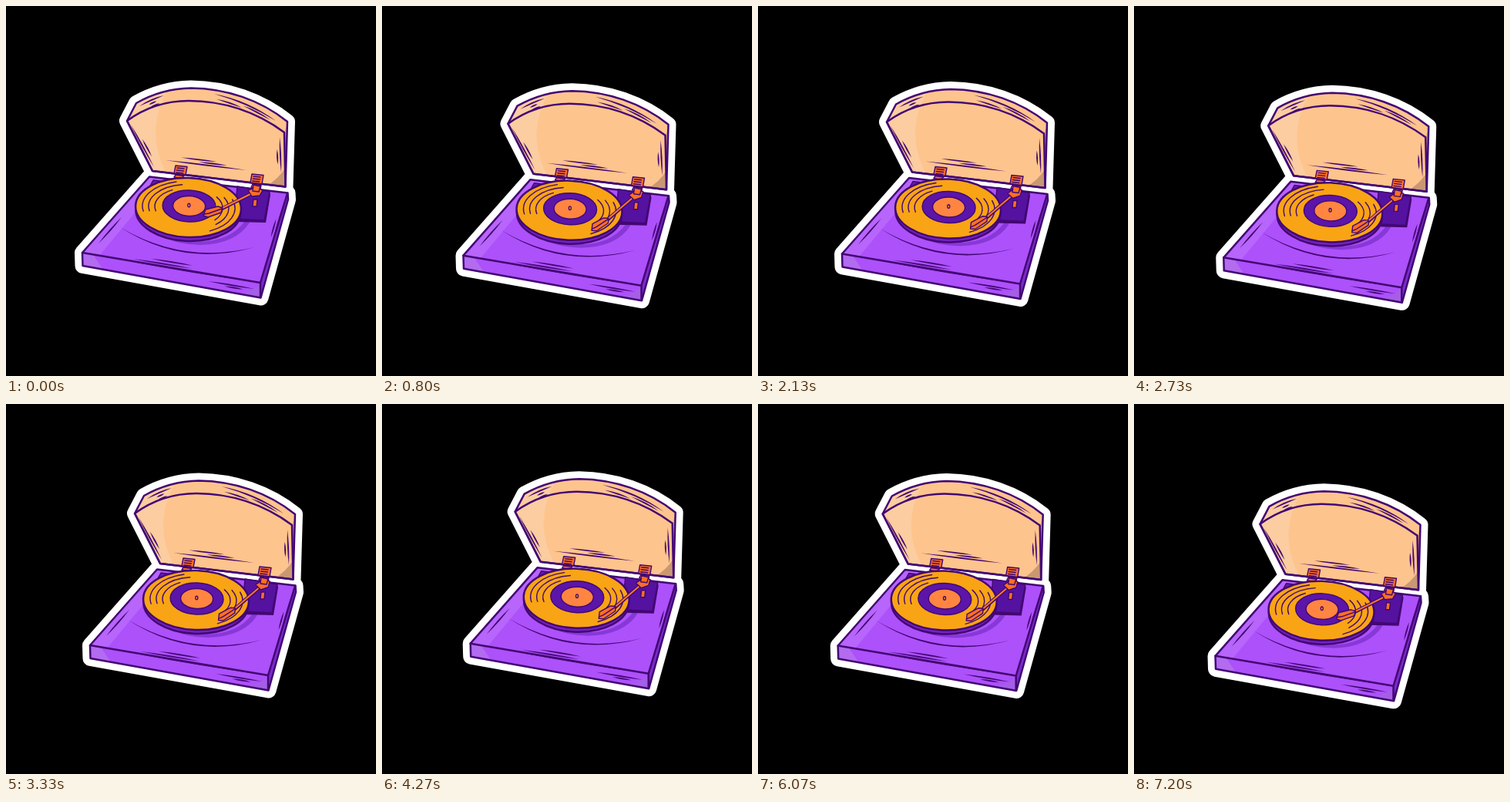
An HTML page that plays this animation: 480x480 px, repeating every 7270 ms.

```html
<!DOCTYPE html>
<html lang="en">
<head>
<meta charset="utf-8">
<title>Record player sticker</title>
<style>
  html, body { margin: 0; width: 100%; height: 100%; overflow: hidden; background: #000; }
  svg { display: block; width: 100vw; height: 100vh; }
  .ink { stroke: #430773; stroke-width: 2.5; stroke-linejoin: round; stroke-linecap: round; }
  .thin { stroke-width: 1.4; }
  .line { fill: none; }
  .orange { fill: #fb6f24; }
</style>
</head>
<body>
<svg viewBox="0 0 480 480">
  <defs>
    <path id="lid" d="M157 149 L169 126 C190 114 214 107 240 106.500 C286 107 330 122 365 150 L362.500 234.500 L190 214 Z"/>
    <path id="body" d="M186 221.500 L365.500 242.500 L366 251 L330.500 378.500 L99.500 337 L99 320 Z"/>
    <path id="face" d="M157 149 C183 130 209 123 237 123 C283 123 326 138 361 164 L362.500 234.500 L190 214 Z"/>
    <clipPath id="inLid"><use href="#lid"/></clipPath>
    <clipPath id="inBody"><use href="#body"/></clipPath>
  </defs>
  <g id="sticker">
    <g fill="#fff" stroke="#fff" stroke-width="20" stroke-linejoin="round">
      <use href="#lid"/><use href="#body"/>
    </g>

    <!-- lid -->
    <use href="#lid" fill="#fec48d"/>
    <g clip-path="url(#inLid)">
      <path d="M150 100 H215 Q176 160 210 220 H150 Z" fill="#fbcda0"/>
      <path d="M337 234 Q353 225 364 208 V238 Z" fill="#c99873"/>
      <path d="M361 164 L366 150 L363 235 Z" fill="#e0a97e"/>
    </g>
    <use href="#face" class="ink line"/>
    <use href="#lid" class="ink line"/>

    <!-- body -->
    <use href="#body" fill="#ad51fb"/>
    <g clip-path="url(#inBody)">
      <path d="M186 221 L204 224 L121 324 L98 320 Z" fill="#b765fb"/>
      <path d="M98 320 L113 322.500 L126 342 L99 338 Z" fill="#b36bf0"/>
      <path d="M330 359 L365 243 L370 252 L331 381 Z" fill="#7a2bcb"/>
      <path d="M296 374 Q319 372 330 360 V380 Z" fill="#a45fe6"/>
    </g>
    <path class="ink line" d="M99 320 L330 359 L365 243 M330 359 V378"/>
    <use href="#body" class="ink line"/>

    <!-- deck -->
    <path class="ink thin" fill="#6419b5" d="M191 226 L207 228 L194 241 L186 235 Z"/>
    <path fill="#8738d7" d="M203 299 Q281 319 310 279 L316 281 Q298 309 252 310 Q221 309 203 299 Z"/>
    <path class="ink thin" fill="#5512a0" d="M300 234 L342 241 L335 278 L296 276 Z"/>
    <path fill="#430773" d="M296 276 L335 278 L342 241 L343 245 L337 281 L297 280 Z"/>

    <!-- hinges -->
    <g class="ink thin orange" id="hinges">
      <path d="M220 207 L235 208.500 L233 219 L218 217 Z M220 219 L231 220.500 L227 224 L218 222 Z"/>
      <path d="M319 218 L334 219.500 L332 231 L317 229 Z M320 231 L331 232.500 L330 238 L318 235 Z"/>
    </g>

    <!-- record -->
    <g transform="rotate(2 237 262)">
      <ellipse class="ink" cx="236.500" cy="266" rx="68" ry="39" fill="#7422be"/>
      <ellipse class="ink" cx="236.500" cy="261.500" rx="68.500" ry="38.500" fill="#f9a415"/>
      <g class="ink thin line" id="grooves"></g>
      <ellipse class="ink thin" cx="237.500" cy="259.500" rx="34.500" ry="20.500" fill="#5b15a9"/>
      <ellipse class="ink thin" cx="237.500" cy="259.500" rx="21" ry="13" fill="#ff8540"/>
    </g>
    <ellipse class="ink thin" cx="237.300" cy="258.500" rx="1.500" ry="2.300" fill="#f9a415"/>

    <g id="streaks" fill="#430773"></g>

    <!-- tonearm -->
    <path class="ink thin orange" d="M321 251 L326 251 L325 260 L320 260 Z"/>
    <g id="arm">
      <path class="ink line" style="stroke-width:4.500" d="M321 242 L280 263"/>
      <path class="line" stroke="#fb7a2c" stroke-width="2" d="M321 242 L279 263"/>
      <path class="ink thin orange" d="M259 264 L275 260 L281 262 L279 268 L262 274 L256 272 Z"/>
      <path class="ink thin line" d="M257 270 L263 269 L280 263"/>
      <path class="ink thin orange" d="M314 239 L325 235 L333 239 L329 246 L319 247 Z"/>
    </g>
    <path class="ink thin orange" d="M321 232 L330 234 L328 241 L320 240 Z"/>
  </g>
</svg>
<script>
  const $ = id => document.getElementById(id);
  const LOOP = 7270, FRAME = 200 / 3, LAST = 108;

  let seed = 7;
  const random = () => (seed = seed * 16807 % 2147483647) / 2147483647;
  const ease = u => (1 - Math.cos(Math.PI * u)) / 2;
  const mix = (a, b, u) => a + (b - a) * u;

  function addPath(parent, d) {
    const p = document.createElementNS("http://www.w3.org/2000/svg", "path");
    p.setAttribute("d", d);
    parent.appendChild(p);
  }

  // Tapered pen strokes side by side: the first runs full length, the rest are shorter.
  function hatch(x1, y1, x2, y2, count = 1, gap = 0, bend = 0) {
    const len = Math.hypot(x2 - x1, y2 - y1);
    const nx = (y1 - y2) / len, ny = (x2 - x1) / len;
    for (let i = 0; i < count; i++) {
      const from = i ? random() * .5 : 0, size = i ? .3 + random() * .2 : 1;
      const at = (u, off) => {
        const k = off + i * gap;
        return `${mix(x1, x2, u) + nx * k} ${mix(y1, y2, u) + ny * k}`;
      };
      const arc = u => bend * 2 * u * (1 - u);
      const to = from + size, mid = from + size / 2;
      const a = at(from, arc(from)), b = at(to, arc(to)), m = arc(mid) + bend * size * size / 2;
      addPath($("streaks"), `M${a} Q${at(mid, m - 2)} ${b} Q${at(mid, m + 2)} ${a}Z`);
    }
  }

  hatch(148, 287, 322, 313, 1, 0, 38);       // curve below the record
  hatch(164, 332, 322, 358, 3, -4);          // front edge of the top
  hatch(262, 357, 322, 367, 2, 3);           // front side
  hatch(120, 308, 150, 274);                 // left edge
  hatch(345, 310, 360, 257, 2, -4);          // right edge
  hatch(162, 154, 192, 209, 2, -4);          // lid, left
  hatch(355, 170, 357, 216, 2, 4);           // lid, right
  hatch(207, 200, 312, 213, 3, -3);          // lid, bottom
  hatch(173, 130, 205, 116, 3, 4, -2);       // rim, left
  hatch(270, 114, 350, 149, 3, 3, -8);       // rim, right

  for (const [x, y] of [[222, 210], [321, 221]])
    for (let i = 0; i < 3; i++) addPath($("hinges"), `M${x - i * .6} ${y + i * 3} l9 1`);

  // Each ring of the record gets one arc on the left and one on the right.
  for (let ring = 0; ring < 3; ring++) {
    const rx = 60 - 8 * ring, ry = rx * .565;
    const at = deg => {
      const r = deg * Math.PI / 180;
      return `${237 + rx * Math.cos(r)} ${261 + ry * Math.sin(r)}`;
    };
    for (const side of [155, 335]) {
      const a = side + random() * 30 - 15;
      addPath($("grooves"), `M${at(a)} A${rx} ${ry} 0 0 1 ${at(a + 65 + random() * 30)}`);
    }
  }

  // Resting points of the shake: step, x, y.
  const rests = [
    [0, 0, 0], [12, 6.5, 3.7], [32, 10, 1.5], [50, 10, -7],
    [64, 15.7, -9.3], [91, 4.7, -6.5], [108, 6.5, 6.8]
  ];

  // Drift from rest to rest, with a jitter that fades out at each of them.
  function shake(n) {
    const i = Math.max(1, rests.findIndex(r => r[0] >= n));
    const [a, ax, ay] = rests[i - 1], [b, bx, by] = rests[i];
    const u = (n - a) / (b - a);
    const fade = Math.sqrt(Math.sin(Math.PI * u));
    const jitter = (f, g) => fade * (7 * Math.sin(n * f) + 6 * Math.sin(n * g));
    return [mix(ax, bx, u) + jitter(.62, .97), mix(ay, by, u) + jitter(-.71, 1.09)];
  }

  function draw(now) {
    const n = Math.min(LAST, Math.floor((now % LOOP + 3.4) / FRAME));
    const [x, y] = shake(n);
    const swing = -14 * ease(Math.max(0, Math.min(1, n / 10, (LAST - n) / 10)));
    $("sticker").setAttribute("transform", `translate(${x} ${y})`);
    $("arm").setAttribute("transform", `rotate(${swing} 324 241)`);
  }

  const start = performance.now();
  function tick() {
    draw(performance.now() - start);
    requestAnimationFrame(tick);
  }
  tick();
</script>
</body>
</html>
```
